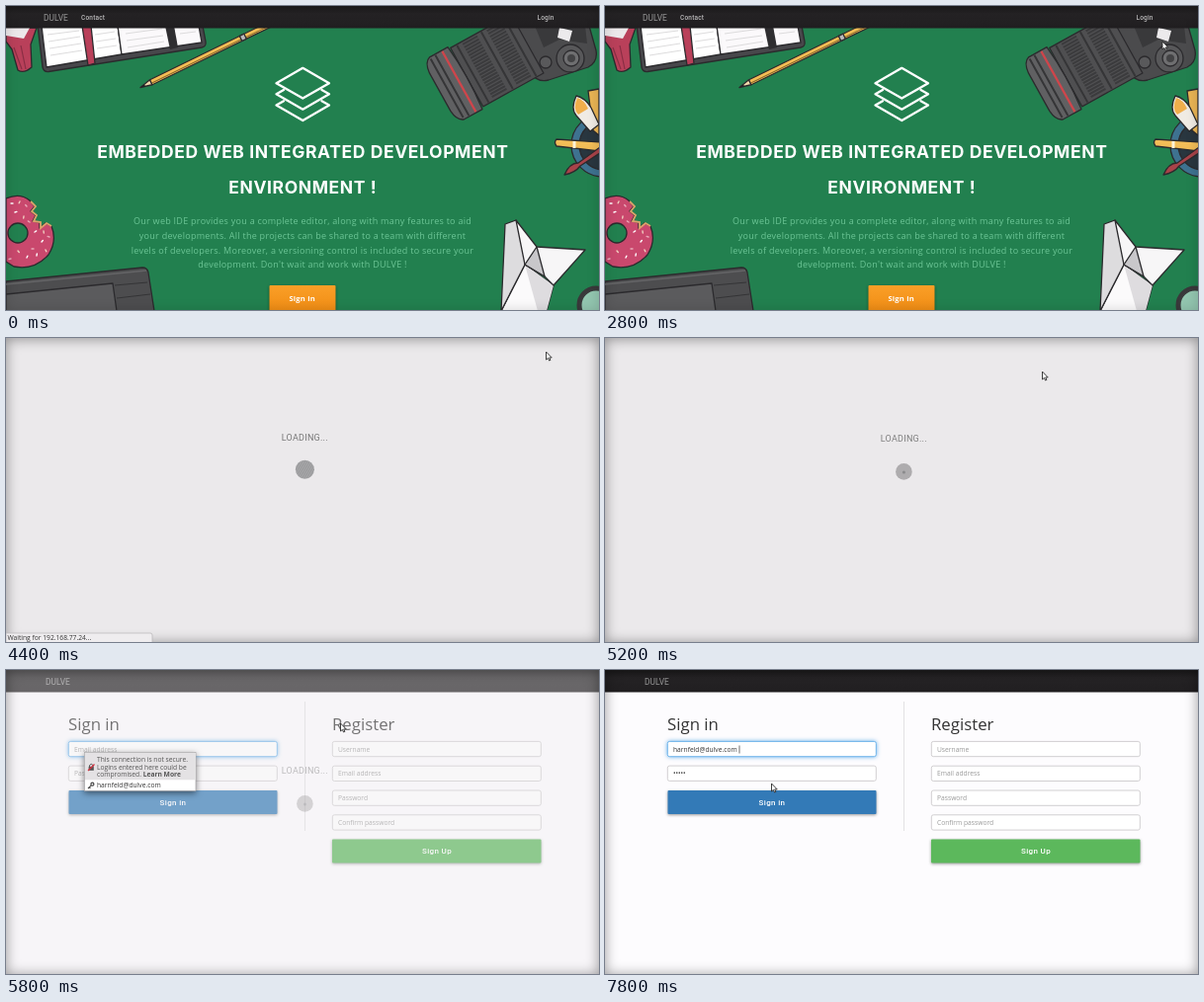
Recreate the animation shown at these times as an HTML page. Size 600 px wide and 308 px high, loop 8000 ms.

```html
<!DOCTYPE html>
<html lang="en">
<head>
<meta charset="utf-8">
<title>Web IDE sign in</title>
<style>
html, body { margin: 0; width: 100%; height: 100%; overflow: hidden; background: #fdfcfe; }
svg { position: absolute; left: 0; top: 0; width: 600px; height: 308px; display: block; }
text { font-family: "Open Sans", sans-serif; }
.edge { position: absolute; left: 0; top: 0; width: 600px; height: 308px; box-shadow: inset 0 1px 13px rgba(0,0,0,.4); }
.robo { font-family: Roboto, sans-serif; }
.mid { text-anchor: middle; }
.nav { font: 500 6.5px Roboto, sans-serif; fill: #b9b8b9; letter-spacing: .2px; }
.brand { font: 8.4px Roboto, sans-serif; fill: #999; }
.title { font: 700 17.5px Inter, sans-serif; fill: #fff; letter-spacing: .6px; }
.lead { font-size: 9px; fill: #6cc596; letter-spacing: .27px; }
.head { font-size: 16.8px; fill: #333; }
.hint { font-size: 6.7px; fill: #999; }
.small { font-size: 6.7px; fill: #333; }
.btn { font: 500 8px Roboto, sans-serif; fill: #fff; letter-spacing: .35px; }
.ink { stroke: #2b2a2d; stroke-width: 1.3; stroke-linejoin: round; stroke-linecap: round; }
.shadow { filter: drop-shadow(0 1px 1.5px rgba(0,0,0,.4)); }
</style>
</head>
<body>
<svg viewBox="0 0 600 308">
  <defs>
    <linearGradient id="bar" x2="0" y2="1"><stop stop-color="#1c1b1c"/><stop offset=".35" stop-color="#252325"/><stop offset="1" stop-color="#201e20"/></linearGradient>
    <linearGradient id="orange" x2="0" y2="1"><stop stop-color="#fa9f27"/><stop offset="1" stop-color="#f08c14"/></linearGradient>
    <pattern id="hatch" width="2" height="2" patternUnits="userSpaceOnUse" patternTransform="rotate(30)"><rect width="2" height="2" fill="#a9a9ab"/><rect width="1" height="2" fill="#979799"/></pattern>
  </defs>

  <g id="home">
    <rect width="600" height="308" fill="#22804f"/>

    <!-- red cup -->
    <path class="ink" d="M0 36L6 44L12 65Q18 69 26 62L25 39L31 22H0Z" fill="#b9405a"/>
    <path d="M0 22H24L18 33L0 30Z" fill="#ece8ea"/>
    <path d="M8 42L16 64M15 40L20 64" stroke="#8a2e44" stroke-width="1.2"/>

    <!-- notebook -->
    <path class="ink" d="M32 20L37 62Q38 67 43 66.5L198 42Q203 41 202 36L199 20Z" fill="#48474b"/>
    <path class="ink" d="M36 20L41 62L117 49L113 20Z" fill="#fff"/>
    <path class="ink" d="M113 20L117 49L198 37L195 20Z" fill="#fbf9fb"/>
    <path d="M42 29L74 25M43 36L75 31M44 43L76 38M45 50L77 45M90 29L110 26M91 36L111 33M92 43L112 40M121 28L158 23M122 35L159 30M123 42L160 36M176 28L192 26" stroke="#d9d7d9" stroke-width=".9"/>
    <path class="ink" d="M77 20H86L90 58L83 60Z" fill="#b9405a"/>
    <path d="M161 20H170L174 42L166 44Z" fill="#2f2e31"/>

    <!-- pencil -->
    <g transform="translate(136 82.5) rotate(-26)">
      <path class="ink" d="M0 0L12 -2.8V2.8Z" fill="#f3d9ac"/>
      <path class="ink" d="M12 -2.8H145V2.8H12Z" fill="#f4bd55"/>
      <path d="M13 1H145" stroke="#8d6a2d" stroke-width="1"/>
      <path d="M0 0L5 -1.3V1.3Z" fill="#222426"/>
      <path class="ink" d="M113 -2.8H118V2.8H113Z" fill="#b9b9bc"/>
    </g>

    <!-- camera -->
    <path class="ink" d="M496 20L531 68Q538 78 549 75L589 62Q599 57 597 45L590 20Z" fill="#4b4b4d"/>
    <path d="M535 20L544 42L560 34L588 38L586 20Z" fill="#39393b"/>
    <g transform="translate(457.5 77) rotate(-29)">
      <path class="ink" d="M10 -34H80V34H10Z" fill="#4f4f51"/>
      <path class="ink" d="M-13 -36H8Q12 0 8 36H-13Q-20 34 -21 22V-22Q-20 -34 -13 -36Z" fill="#606062"/>
      <path d="M-13 -34V34M-7 -35V35M17 -33V33M45 -33V33M72 -33V33" stroke="#353537" stroke-width="2"/>
      <path d="M31 -32V32M59 -32V32" stroke="#3b3b3d" stroke-width="17" stroke-dasharray="2 1.2"/>
      <path d="M1 -35V35" stroke="#cf454b" stroke-width="2.2"/>
    </g>
    <path d="M560 22L573 25L570 36L558 32Z" fill="#eceaec"/>
    <circle class="ink" cx="571" cy="53" r="14" fill="#58585a"/>
    <circle class="ink" cx="572" cy="53" r="8" fill="#6f6f71"/>
    <circle cx="572" cy="53" r="4" fill="#434345"/>
    <circle class="ink" cx="546" cy="57" r="6" fill="#59595b"/>

    <!-- brushes -->
    <circle class="ink" cx="604" cy="141" r="32" fill="#3e7290"/>
    <circle class="ink" cx="605" cy="141" r="25" fill="#29363f"/>
    <path class="ink" d="M589 86L600 84V131L594 126Z" fill="#e9b454"/>
    <path class="ink" d="M577 91Q571 104 577 111L591 127L600 120L592 103Q586 93 577 91Z" fill="#f0ebe4"/>
    <path d="M578 93Q573 104 579 110L589 104Q585 95 578 93Z" fill="#f0ae4b"/>
    <path class="ink" d="M557 135Q554 138 557 142L601 147V138Z" fill="#f3bd57"/>
    <path d="M575 137V144" stroke="#fff2d6" stroke-width="3"/>
    <path class="ink" d="M565 171Q570 159 579 159L601 143V149L581 162Q576 169 565 171Z" fill="#a84349"/>

    <!-- glasses -->
    <circle cx="597" cy="303" r="17" fill="#93c6b0" stroke="#39393b" stroke-width="5"/>

    <!-- paper plane -->
    <path class="ink" d="M525 262L501 309H547L554 283Z" fill="#fbfafb"/>
    <path d="M525 262L554 283L547 309H538Z" fill="#dedcdf"/>
    <path class="ink" d="M505 221L516 217L535 246L525 262L501 309Z" fill="#dddcde"/>
    <path class="ink" d="M516 217L537 244L586 247L554 283L545 274L525 262Z" fill="#f7f6f7"/>
    <path class="ink" d="M525 262L537 244L545 274Z" fill="#c8c7ca"/>

    <!-- doughnut -->
    <path class="ink" fill-rule="evenodd" fill="#c9486d" d="M0 195Q14 189 24 197L29 203L25 208L30 212L27 218L34 219L34 225L40 220L46 223Q52 238 43 252Q29 268 8 264L0 259ZM2 230A10 10 0 0 0 22 230A10 10 0 0 0 2 230Z"/>
    <path d="M25 198L30 203L26 208L31 212L28 218L35 219L35 225L41 220L46 223" fill="none" stroke="#dba36b" stroke-width="1.8"/>
    <g id="sprinkles" stroke-width="1.4" stroke-linecap="round"></g>

    <!-- tablet -->
    <path class="ink" d="M0 279L138 265Q143 265 144 270L150 309H0Z" fill="#4d4d4f"/>
    <path class="ink" d="M0 292L108 281L112 309H0Z" fill="#5b5b5d"/>
    <path d="M0 282L142 268" stroke="#656567" stroke-width="1.5"/>
    <path d="M112 296L146 292M110 283L143 280" stroke="#343436"/>

    <g fill="none" stroke="#fff" stroke-width="2.3" stroke-linejoin="round" stroke-linecap="round">
      <path d="M300.3 62.8L327 78.2L300.3 93.6L273.5 78.2Z"/>
      <path d="M281 85L273.5 89.3L300.3 104.7L327 89.3L319.5 85"/>
      <path d="M281 96.2L273.5 100.5L300.3 116L327 100.5L319.5 96.2"/>
    </g>
    <text class="title mid" x="300.3" y="154">EMBEDDED WEB INTEGRATED DEVELOPMENT</text>
    <text class="title mid" x="300.3" y="190">ENVIRONMENT !</text>
    <g id="lead"></g>
    <rect class="shadow" x="266.5" y="283" width="67" height="27" rx="1" fill="url(#orange)"/>
    <text class="mid" x="299.7" y="298.6" font-size="7.6" font-weight="700" fill="#fff" letter-spacing=".2">Sign in</text>

    <rect width="600" height="22.5" fill="url(#bar)"/>
    <g id="hover"><rect x="531" width="30.5" height="22" fill="#464547"/><path d="M531 21.8H561.5" stroke="#4a90c4" stroke-width="1.2"/><path d="M531 0V22M561.5 0V22" stroke="#6b6a6c" stroke-width=".7"/></g>
    <text class="brand" x="38" y="14.6">DULVE</text>
    <text class="nav" x="76" y="13.8">Contact</text>
    <text class="nav" x="537.5" y="13.8">Login</text>
  </g>

  <g id="login">
    <rect width="600" height="308" fill="#fdfcfe"/>
    <rect width="600" height="22.5" fill="url(#bar)"/>
    <text class="brand" x="40" y="14.6">DULVE</text>
    <path d="M302.5 32V163" stroke="#e2e1e3"/>
    <text class="head" x="63" y="60.7">Sign in</text>
    <text class="head" x="330" y="60.7">Register</text>
    <g id="fields"></g>
    <g class="shadow"><rect x="63.5" y="122" width="211" height="24" rx="1" fill="#337ab7"/><rect x="330" y="171.5" width="211.5" height="24" rx="1" fill="#5cb85c"/></g>
    <text class="btn mid" x="169" y="136.8">Sign in</text>
    <text class="btn mid" x="436" y="186.3">Sign Up</text>
    <g id="filled"><text class="small" x="69" y="82.6">harnfeld@dulve.com</text><path d="M136 76.5V84.5" stroke="#333" stroke-width=".7"/><text class="small" x="69" y="107.3">•••••</text></g>
  </g>

  <rect id="veil" width="600" height="308" fill="#ebe9eb"/>
  <g id="loader">
    <text class="robo mid" x="302.3" y="103.5" font-size="9" fill="#777" letter-spacing=".25">LOADING...</text>
    <circle id="spin" cx="302.4" cy="133.2" r="9.5" fill="url(#hatch)"/>
    <circle id="dot" cx="302.4" cy="135" r="1.6" fill="#858587"/>
  </g>
</svg>
<div class="edge" id="edge"></div>
<svg viewBox="0 0 600 308">
  <g id="status"><path id="tab" fill="#efedef" stroke="#bbb9bb" stroke-width=".8"/><text id="url" class="small" x="1.5" y="306.2"></text></g>
  <g id="popup">
    <rect x="79.5" y="83.5" width="112.5" height="38.8" fill="#fff" stroke="#a9a7a9" stroke-width=".7" style="filter:drop-shadow(0 2px 3px rgba(0,0,0,.5))"/>
    <rect x="80" y="84" width="111.5" height="27.3" fill="#e4e2e4"/>
    <g class="small">
      <text x="92" y="93" fill="#555">This connection is not secure.</text>
      <text x="92" y="100.7" fill="#555">Logins entered here could be</text>
      <text x="92" y="108.3" fill="#555">compromised. <tspan font-weight="700">Learn More</tspan></text>
      <text x="92" y="119.3">harnfeld@dulve.com</text>
    </g>
    <path d="M84.5 98V96.5Q86.2 94 88 96.5V98" fill="none" stroke="#555"/>
    <rect x="83.6" y="97.8" width="5.2" height="4" fill="#555"/>
    <path d="M83 102L89.5 95.5" stroke="#d5303e" stroke-width="1.3"/>
    <circle cx="87.4" cy="115.7" r="1.5" fill="none" stroke="#444" stroke-width="1.2"/>
    <path d="M86.3 116.8L83 120M84.3 118.6L85.4 119.8" stroke="#444" stroke-width="1.1"/>
  </g>
  <g id="cursor" stroke="#2b2b2b" stroke-width=".9" fill="#fff" stroke-linejoin="round">
    <path id="arrow" d="M0 0V8L1.9 6.4L3.1 9L4.4 8.4L3.2 5.9H5.7Z"/>
    <path id="hand" stroke-width=".7" d="M0 .7Q.8 -.5 1.6 .7V3.3L4.6 4Q5.4 4.3 5.2 5.3L4.5 8H.3L-2 4.7Q-1.5 3.7 0 5Z"/>
  </g>
</svg>
<script>
const LOOP = 8000, STEP = 200;
const $ = id => document.getElementById(id);
const show = (id, on) => $(id).style.display = on ? "" : "none";

$("lead").innerHTML = [
  "Our web IDE provides you a complete editor, along with many features to aid",
  "your developments. All the projects can be shared to a team with different",
  "levels of developers. Moreover, a versioning control is included to secure your",
  "development. Don't wait and work with DULVE !"
].map((line, i) => `<text class="lead mid" x="300" y="${221.3 + i * 14.7}">${line}</text>`).join("");

const field = (x, y, hint, id = "", focus = false) =>
  `<rect x="${x}" y="${y}" width="211" height="15.3" rx="2" fill="#fff" stroke="${focus ? "#66afe9" : "#cccacc"}" stroke-width=".9"
    ${focus ? 'style="filter:drop-shadow(0 0 2px #66afe9)"' : ""}/><text ${id && `id="${id}"`} class="hint" x="${x + 5.7}" y="${y + 10.2}">${hint}</text>`;
$("fields").innerHTML = field(63.3, 72.4, "Email address", "mailHint", true) + field(63.3, 97.1, "Password", "passHint") +
  ["Username", "Email address", "Password", "Confirm password"].map((h, i) => field(330.3, 72.4 + i * 24.8, h)).join("");

const spots = [[5, 200], [14, 198], [21, 203], [9, 209], [18, 213], [24, 219], [29, 229], [38, 228], [44, 234], [36, 239], [40, 247], [28, 246], [21, 255], [12, 248], [5, 256], [31, 253]];
$("sprinkles").innerHTML = spots.map(([x, y], i) =>
  `<path d="M${x} ${y}l${2 * Math.cos(i * 2)} ${2 * Math.sin(i * 2)}" stroke="${["#fff", "#f0cfc0", "#e9a9b8"][i % 3]}"/>`).join("");

// rows: time, then values
const path = [
  [1200, 166, 10], [1400, 211, 89], [1600, 211, 89], [1800, 293, 152], [2000, 293, 152],
  [2200, 592, 44], [2400, 592, 44], [2600, 576, 42], [2800, 564, 36], [3000, 557, 28],
  [3400, 546.5, 14], [4800, 546.5, 14], [5600, 338.5, 54], [6000, 338.5, 54],
  [6400, 231, 88], [6600, 170, 104.5], [6800, 171, 107], [7200, 188, 126], [7400, 168.5, 115]
];
const veil = [[4200, 0], [4400, 1], [5200, 1], [5600, .7], [6000, 0]];
const ink = [[4200, 0], [4400, 1], [5600, .9], [6000, 0]];

function at(track, t) {
  const i = track.findIndex(k => k[0] > t);
  if (i === 0) return track[0].slice(1);
  if (i < 0) return track[track.length - 1].slice(1);
  const a = track[i - 1], b = track[i], p = (t - a[0]) / (b[0] - a[0]);
  return a.slice(1).map((v, n) => v + (b[n + 1] - v) * p);
}

function draw(t) {
  const home = t < 4400, filled = t >= 7800, hover = home && t >= 3400;
  show("home", home);
  show("login", !home);
  show("hover", hover);
  show("filled", filled);
  show("mailHint", !filled);
  show("passHint", !filled);
  show("popup", t >= 5400 && !filled);
  $("edge").style.opacity = home ? .4 : 1;
  $("veil").style.opacity = at(veil, t)[0];
  $("loader").style.opacity = at(ink, t)[0];
  const late = t >= 5200;
  $("loader").setAttribute("transform", `translate(0 ${late ? 1 : 0})`);
  $("spin").setAttribute("r", late ? 8.3 : 9.5);
  $("spin").setAttribute("cy", late ? 134.4 : 133.2);
  $("spin").setAttribute("fill", late ? "#aaa8aa" : "url(#hatch)");
  show("dot", late);

  show("status", t >= 3800 && t < 5000);
  $("tab").setAttribute("d", `M0 299H${home ? 83 : 146}q2 0 2 2V309H0Z`);
  $("url").textContent = home ? "192.168.77.24/dulve/login" : "Waiting for 192.168.77.24...";

  show("cursor", t >= 1200);
  show("arrow", !hover);
  show("hand", hover);
  const [x, y] = at(path, t);
  $("cursor").setAttribute("transform", `translate(${x} ${y})`);
}

const start = performance.now();
function tick() {
  const t = (performance.now() - start) % LOOP;
  draw(Math.floor(t / STEP) * STEP);
  requestAnimationFrame(tick);
}
tick();
</script>
</body>
</html>
```
